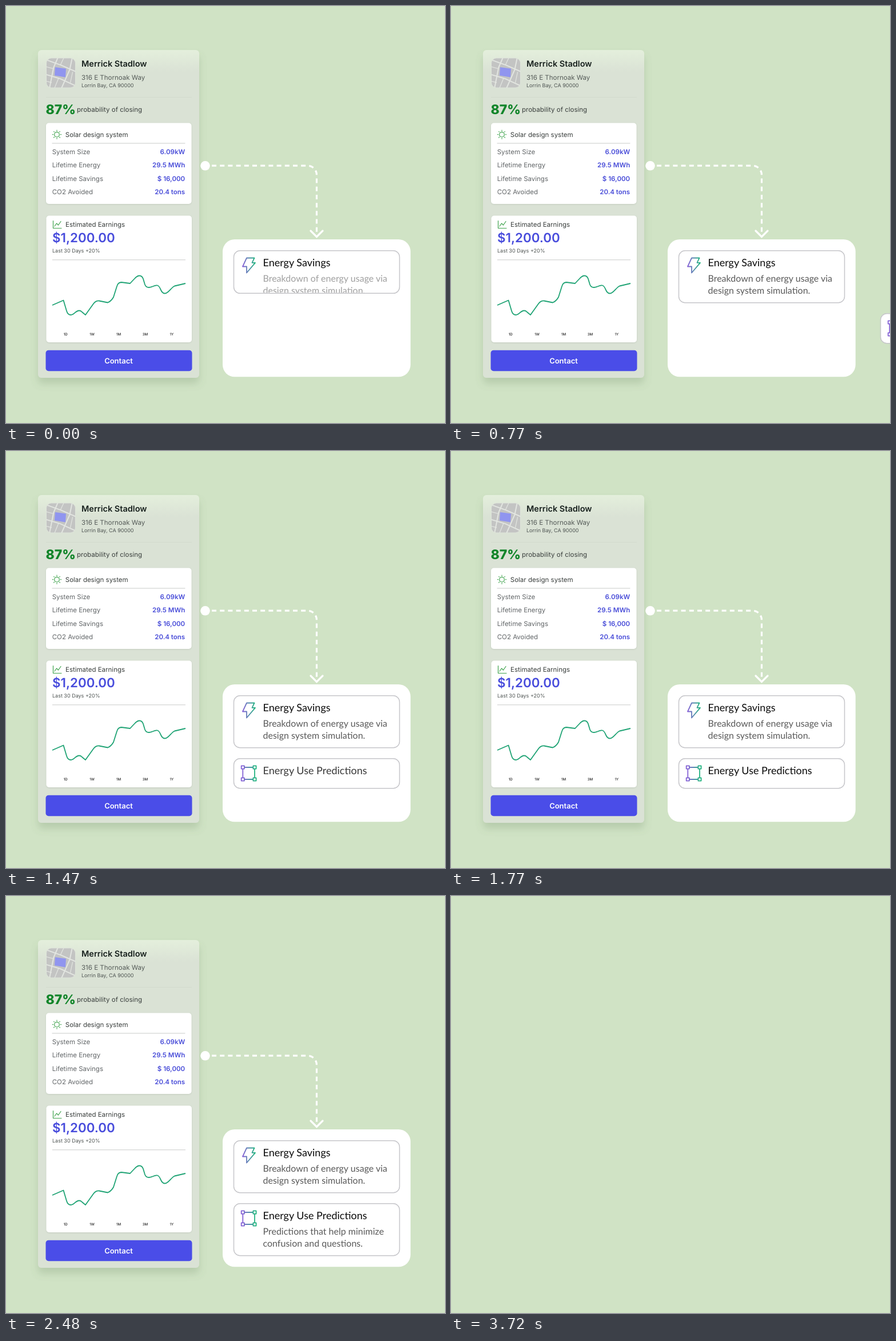
Recreate the animation shown at these times as an HTML page. Size 768 px wide and 729 px high, loop 3.8 s.

```html
<!DOCTYPE html>
<html lang="en">
<head>
<meta charset="utf-8">
<title>Energy savings overview</title>
<style>
  html, body { margin: 0; width: 100%; height: 100%; overflow: hidden; background: #d0e3c5; }
  svg { display: block; width: 100vw; height: 100vh; }
  text { font-family: Inter, sans-serif; font-size: 11.5px; fill: #3a3f3d; text-rendering: geometricPrecision; }
  .name { font-size: 14.5px; font-weight: 600; fill: #17201d; }
  .address { fill: #555b58; }
  .small { font-size: 9px; fill: #4c5250; }
  .percent { font-size: 23px; font-weight: 800; fill: #12852a; }
  .label { fill: #626668; }
  .value { font-weight: 600; fill: #484cd8; text-anchor: end; }
  .amount { font-size: 22.3px; font-weight: 600; fill: #484cdc; }
  .range { font-size: 6.2px; font-weight: 500; fill: #222; text-anchor: middle; }
  .button { font-size: 13px; font-weight: 600; fill: #fff; text-anchor: middle; }
  .title { font: 18px Lato, sans-serif; fill: #0c0c0c; }
  .desc { font: 16px Lato, sans-serif; fill: #5a5a5a; }
  .rule { stroke: #c9cbc9; }
  .green { fill: none; stroke: #3fa34d; stroke-width: 1.2; stroke-linecap: round; stroke-linejoin: round; }
  .tint { fill: none; stroke: url(#tint); stroke-width: 1.8; stroke-linejoin: round; }
  .box { fill: #fff; stroke: #c6c6ca; stroke-width: 1.5; }
</style>
</head>
<body>
<svg viewBox="0 0 768 729" preserveAspectRatio="none">
  <defs>
    <linearGradient id="glass" x1="0" y1="77" x2="0" y2="115" gradientUnits="userSpaceOnUse">
      <stop stop-color="#e4efdc"/>
      <stop offset="1" stop-color="#dae2d5"/>
    </linearGradient>
    <linearGradient id="tint" x1="412" y1="0" x2="438" y2="0" gradientUnits="userSpaceOnUse">
      <stop offset=".1" stop-color="#8562d6"/>
      <stop offset=".9" stop-color="#22b480"/>
    </linearGradient>
    <filter id="cardShadow" x="-20%" y="-10%" width="140%" height="125%">
      <feDropShadow dx="0" dy="10" stdDeviation="7" flood-color="#5f7a58" flood-opacity=".22"/>
    </filter>
    <filter id="softShadow" x="-5%" y="-5%" width="110%" height="112%">
      <feDropShadow dx="0" dy=".8" stdDeviation="1" flood-color="#54604f" flood-opacity=".18"/>
    </filter>
    <clipPath id="mapClip"><rect x="70.5" y="91" width="51" height="52" rx="9"/></clipPath>
  </defs>

  <g id="scene">
    <rect x="56" y="77" width="282" height="573" rx="6" fill="url(#glass)" filter="url(#cardShadow)"/>

    <g clip-path="url(#mapClip)">
      <path d="M70 90h53v54h-53z" fill="#c3c4c3"/>
      <g fill="none" stroke="#e3e6e1" stroke-width="2" transform="rotate(18 96 117)">
        <path d="M60 103L92 104L133 108M84 80L81 112L86 154M106 80L109 107L104 154M60 128L98 127L133 131"/>
        <path d="M94 80L91 104M115 109L117 128M60 115L81 114M95 127L93 154M60 140L86 138" stroke-width="1.2"/>
      </g>
      <path d="M86 107L105 109.500L104 124.500L85 121.500Z" fill="#9095ef"/>
    </g>
    <rect x="70.500" y="91" width="51" height="52" rx="9" fill="none" stroke="#dfe5db"/>

    <text x="132" y="106" class="name">Merrick Stadlow</text>
    <text x="132" y="128.500" class="address">316 E Thornoak Way</text>
    <text x="132" y="142" class="small">Lorrin Bay, CA 90000</text>
    <path d="M70 159.500H325" stroke="#d3dbce"/>
    <text x="69.500" y="188.600" class="percent">87%</text>
    <text x="124" y="185">probability of closing</text>

    <g fill="#fff" filter="url(#softShadow)">
      <rect x="70" y="204.500" width="254.500" height="141.500" rx="5"/>
      <rect x="70.500" y="366.500" width="254.500" height="221.500" rx="5"/>
    </g>
    <g class="green">
      <circle cx="89" cy="224.700" r="4.300"/>
      <g id="rays"></g>
      <path d="M82.500 375.500V388.500H97M85 385L88.500 380L91.500 383L96 376.500"/>
    </g>
    <text x="103.800" y="228.700">Solar design system</text>
    <path d="M80.500 240H313.500M81 443.800H314" class="rule"/>
    <g id="rows"></g>

    <text x="104" y="385.800">Estimated Earnings</text>
    <text x="81" y="413" class="amount">$1,200.00</text>
    <text x="81" y="431" class="small">Last 30 Days +20%</text>
    <path fill="none" stroke="#1fa374" stroke-width="1.800" stroke-linejoin="round" d="M81 523L100.500 514.500L106 533Q108 540 113.500 540C119 540 122 532.500 128 532.500Q131 532.500 133 535L139 540L153 520.500Q157 515 163 515.500L178 518.500Q184 516 188 509L194 490Q196 483 202 483L217 485L226 475.500Q230 471.500 233.500 471.500Q238 471.500 240 477L243 487Q245 492 250 492C256 492 260 487 265 488.500C271 490 270 502.500 278 502.500C284 502.500 289 492 295 489.500L314 485"/>
    <g id="ranges"></g>
    <rect x="69.500" y="601.800" width="256" height="36.500" rx="5" fill="#4a4de8"/>
    <text x="197" y="624.700" class="button">Contact</text>

    <circle cx="348.500" cy="279.300" r="8.300" fill="#fff"/>
    <g fill="none" stroke="#fff" stroke-width="3.200">
      <path d="M360 279.200H527.500A16 16 0 0 1 543.500 295.200V402" stroke-dasharray="8 6.200"/>
      <path d="M533 393L543.500 403.500L554 393" stroke-linecap="round"/>
    </g>

    <rect x="379" y="408" width="328.700" height="240.300" rx="21" fill="#fff"/>
    <g id="panels"></g>
  </g>
</svg>
<script>
const LOOP = 3800;
const find = id => document.getElementById(id);
const fill = (id, items, draw) => { find(id).innerHTML = items.map(draw).join(''); };

fill('rays', [...Array(8).keys()], i =>
  `<path d="M89 218.200V217.200" transform="rotate(${i * 45} 89 224.7)"/>`);

fill('rows', [
  ['System Size', '6.09kW'],
  ['Lifetime Energy', '29.5 MWh'],
  ['Lifetime Savings', '$ 16,000'],
  ['CO2 Avoided', '20.4 tons']
], ([label, value], i) => {
  const y = 259 + i * 23.4;
  return `<text x="80.7" y="${y}" class="label">${label}</text>
    <text x="313.2" y="${y}" class="value">${value}</text>`;
});

fill('ranges', ['1D', '1W', '1M', '3M', '1Y'], (label, i) =>
  `<text x="${104.3 + i * 46.4}" y="575.5" class="range">${label}</text>`);

const corners = [[414.3, 553], [435, 553], [414.3, 574], [435, 574]];
const frameIcon = '<path class="tint" d="M414.300 553H435V574H414.300Z"/>' + corners.map(([x, y]) =>
  `<rect class="tint" x="${x - 2.6}" y="${y - 2.6}" width="5.2" height="5.2" style="fill:#fff"/>`).join('');
const boltIcon = '<path class="tint" d="M421 440.500H434.500L430.500 448.800H436L421 466.500V455.500H414Z"/>';

fill('panels', [
  { top: 427.8, icon: boltIcon, title: 'Energy Savings',
    lines: ['Breakdown of energy usage via', 'design system simulation.'] },
  { top: 537.8, icon: frameIcon, title: 'Energy Use Predictions',
    lines: ['Predictions that help minimize', 'confusion and questions.'] }
], ({ top, icon, title, lines }, i) => `
  <g id="panel${i}">
    <clipPath id="clip${i}"><rect id="mask${i}" x="398" y="${top}" width="290"/></clipPath>
    <rect id="box${i}" class="box" x="398.5" y="${top}" width="290" rx="11"/>
    ${icon}
    <text id="title${i}" class="title" x="449.5" y="${top + 27.2}">${title}</text>
    <g id="desc${i}" clip-path="url(#clip${i})">
      ${lines.map((line, n) => `<text class="desc" x="449.5" y="${top + 53.7 + n * 21.5}">${line}</text>`).join('')}
    </g>
  </g>`);

// Cubic ease-out in evenly timed steps: the first step lands at `first`, the final one at `last`.
function phase(time, first, last, steps) {
  const step = Math.floor((time - first) * (steps - 1) / (last - first) + 1.001);
  const left = 1 - Math.min(steps, Math.max(0, step)) / steps;
  return 1 - left ** 3;
}

function expand(i, amount) {
  const height = 52 + 39 * amount;
  find('box' + i).setAttribute('height', height);
  find('mask' + i).setAttribute('height', height - 1);
  find('desc' + i).setAttribute('opacity', amount);
}

function render(time) {
  expand(0, phase(time, -70, 420, 8));
  expand(1, phase(time, 1980, 2480, 7));
  const offset = 610 * (1 - phase(time, 770, 1130, 6));
  find('panel1').setAttribute('transform', `translate(${offset} 0)`);
  find('title1').setAttribute('opacity', phase(time, 1320, 1770, 7));
  find('scene').setAttribute('opacity', 1 - phase(time, 3320, 3720, 6));
}

const start = performance.now();
function tick() {
  render((performance.now() - start) % LOOP);
  requestAnimationFrame(tick);
}
render(0);
requestAnimationFrame(tick);
</script>
</body>
</html>
```
